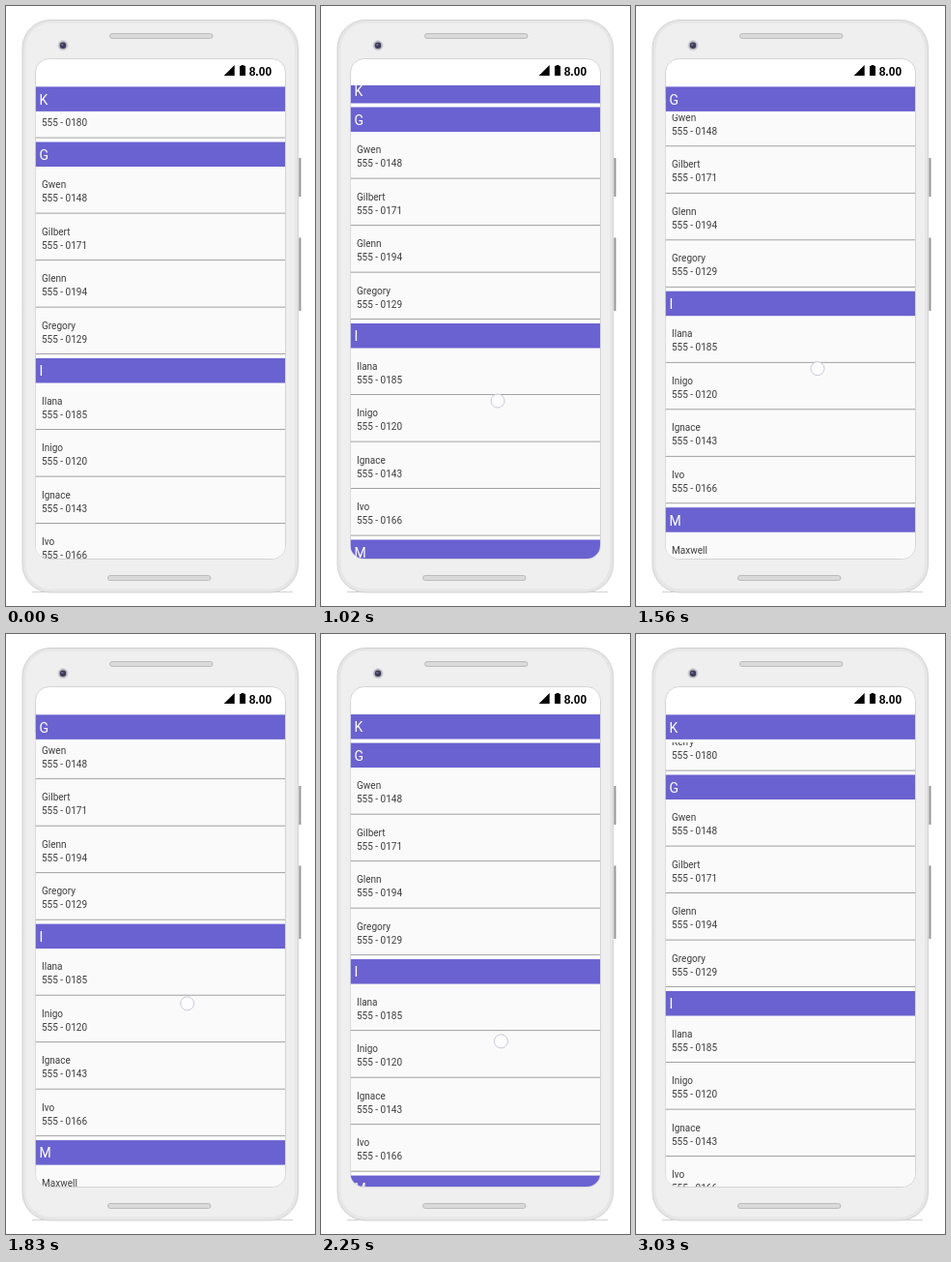
These frames come from a looping animation (320 px wide and 620 px high, 3090 ms). An HTML page with a canvas:

```html
<!DOCTYPE html>
<html lang="en">
<head>
<meta charset="utf-8">
<title>Contact list with sticky headers</title>
<style>
  html, body { margin: 0; width: 100%; height: 100%; overflow: hidden; background: #fff; }
  canvas { display: block; width: 320px; height: 620px; }
</style>
</head>
<body>
<canvas id="stage"></canvas>
<script>
const W = 320, H = 620, LOOP = 3090, STEP = 30;
const PURPLE = '#6a62d0';
const HEAD_H = 25.5, ROW_H = 48.5, GAP = 4, LINE = 0.8;
const SECTION_H = HEAD_H + 4 * ROW_H + GAP;
const LIST_TOP = 82, PIN_TOP = 83.4, LEFT = 30.6, WIDTH = 258.4;

const sections = [
  ['K', 'Kurt', 'Kelly', 'Kenji', 'Kerry'],
  ['G', 'Gwen', 'Gilbert', 'Glenn', 'Gregory'],
  ['I', 'Ilana', 'Inigo', 'Ignace', 'Ivo'],
  ['M', 'Maxwell', 'Mona', 'Mabel', 'Moritz']
];

// [time, value] keys: top of the second section, then the touch point
const scrollKeys = [[270, 140.5], [690, 119.1], [1020, 104.5], [1350, 84], [1560, 71.2],
  [1680, 69], [1860, 78], [2040, 92], [2490, 133.9], [2820, 145.5]];
const touchX = [[270, 178], [690, 179.5], [1020, 183], [1560, 188], [2040, 187], [2550, 186]];
const touchGap = [[270, 302], [690, 302], [1020, 303.5], [1560, 303.5], [2040, 307.5], [2550, 308.6]];
const TOUCH_START = 300, TOUCH_END = 2550;

const canvas = document.getElementById('stage');
const ctx = canvas.getContext('2d');
const ratio = window.devicePixelRatio || 1;
canvas.width = W * ratio;
canvas.height = H * ratio;

// Smooth curve through the keys, flat at both ends
function curve(keys, t) {
  const last = keys.length - 1;
  if (t <= keys[0][0]) return keys[0][1];
  if (t >= keys[last][0]) return keys[last][1];
  const i = keys.findIndex(k => k[0] > t) - 1;
  const slope = n => n === 0 || n === last ? 0
    : (keys[n + 1][1] - keys[n - 1][1]) / (keys[n + 1][0] - keys[n - 1][0]);
  const [t0, a] = keys[i], [t1, b] = keys[i + 1];
  const d = t1 - t0, u = (t - t0) / d, u2 = u * u, u3 = u2 * u;
  return (2 * u3 - 3 * u2 + 1) * a + (u3 - 2 * u2 + u) * d * slope(i)
    + (3 * u2 - 2 * u3) * b + (u3 - u2) * d * slope(i + 1);
}

function rounded(x, y, w, h, r, fill, stroke) {
  ctx.beginPath();
  ctx.roundRect(x, y, w, h, r);
  if (fill) { ctx.fillStyle = fill; ctx.fill(); }
  if (stroke) { ctx.strokeStyle = stroke; ctx.stroke(); }
}

function disc(x, y, r, fill, stroke) {
  ctx.beginPath();
  ctx.arc(x, y, r, 0, Math.PI * 2);
  ctx.fillStyle = fill;
  ctx.fill();
  if (stroke) { ctx.strokeStyle = stroke; ctx.stroke(); }
}

function label(text, x, y, font, color) {
  ctx.font = font;
  ctx.fillStyle = color;
  ctx.fillText(text, x, y);
}

function rect(x, y, w, h, color) {
  ctx.fillStyle = color;
  ctx.fillRect(x, y, w, h);
}

const box = (y, h, color) => rect(LEFT, y, WIDTH, h, color);

function drawPhone() {
  ctx.lineWidth = 1;
  for (const [y, h] of [[157, 40], [239.5, 75.5]]) {
    rect(302, y, 3.3, h, '#c4c4c6');
    rect(304, y, 1.3, h, '#929294');
  }
  rect(27, 605, 270, 1, '#d2d2d2');
  rounded(17, 14.5, 285.5, 591.5, 29, '#e6e6e7', '#d2d2d3');
  rounded(20.5, 17.5, 278.5, 585, 26, '#efeff0');
  rounded(107.5, 28.5, 106.5, 5, 2.5, '#dadadb', '#bcbcbe');
  rounded(105.5, 588.5, 106.5, 5, 2.5, '#dadadb', '#bcbcbe');
  disc(59, 40.7, 5, '#b4b4bc', '#d6d6d9');
  disc(59, 40.7, 3.2, '#3d3c58');
  disc(58.3, 40, 1.1, '#7775a0');
  rounded(30.5, 54.5, 259, 517, 14, '#fff', '#d4d4d6');
}

function drawStatus() {
  ctx.fillStyle = '#000';
  ctx.beginPath();
  ctx.moveTo(236.7, 61);
  ctx.lineTo(236.7, 72);
  ctx.lineTo(225.7, 72);
  ctx.fill();
  rect(243.5, 61, 3, 2, '#000');
  rect(242, 62, 6, 10, '#000');
  label('8.00', 251.7, 72, 'bold 12px "Liberation Sans", sans-serif', '#000');
}

function drawHeader(letter, y) {
  box(y, HEAD_H, PURPLE);
  label(letter, 34.6, y + 18.3, '14px Roboto, sans-serif', '#fff');
}

function drawRow(name, number, y) {
  const font = '10px Roboto, sans-serif';
  box(y, ROW_H, '#fafafa');
  label(name, 37, y + 22, font, '#3c3c3c');
  label(number, 37, y + 36, font, '#3c3c3c');
}

function drawList(base) {
  const tops = sections.map((_, i) => base + (i - 1) * SECTION_H);
  ctx.save();
  ctx.beginPath();
  ctx.roundRect(LEFT, LIST_TOP, WIDTH, 571 - LIST_TOP, [0, 0, 13.5, 13.5]);
  ctx.clip();
  sections.forEach(([letter, ...names], i) => {
    const first = tops[i] + HEAD_H;
    names.forEach((name, r) => {
      const number = '555 - 01' + (11 + (i * 37 + r * 23) % 88);
      drawRow(name, number, first + r * ROW_H);
    });
    names.forEach((_, r) => box(first + (r + 1) * ROW_H - LINE, LINE, '#8c8c8f'));
    drawHeader(letter, tops[i]);
  });

  // The pinned header is pushed up by the next one
  const pinned = tops.filter(y => y <= PIN_TOP).length - 1;
  const y = Math.min(PIN_TOP, tops[pinned + 1] - GAP - HEAD_H);
  box(LIST_TOP, y + HEAD_H + 3 - LIST_TOP, '#fff');
  drawHeader(sections[pinned][0], y);
  ctx.restore();
}

function draw(t) {
  ctx.setTransform(ratio, 0, 0, ratio, 0, 0);
  rect(0, 0, W, H, '#fff');
  drawPhone();
  drawStatus();
  const base = curve(scrollKeys, t);
  drawList(base);
  if (t >= TOUCH_START && t < TOUCH_END) {
    disc(curve(touchX, t), base + curve(touchGap, t), 7, '#fdfdfe', '#c9c8dc');
  }
}

const start = performance.now();
function frame() {
  const t = (performance.now() - start) % LOOP;
  draw(Math.floor(t / STEP) * STEP);
  requestAnimationFrame(frame);
}
frame();
</script>
</body>
</html>
```
